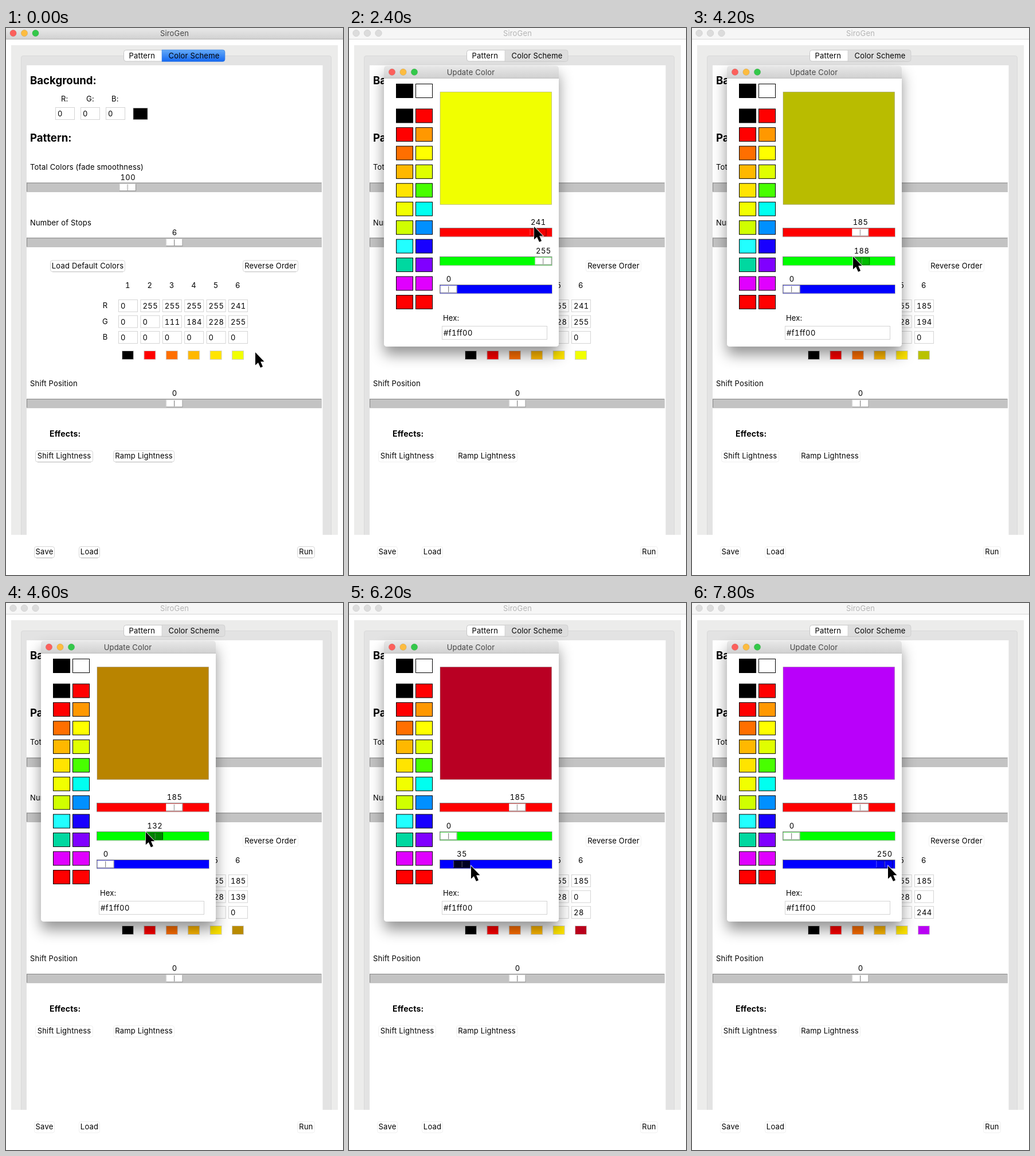
These frames come from a looping animation (588x953 px, 8000 ms). An HTML page:

```html
<!DOCTYPE html>
<html lang="en">
<head>
<meta charset="utf-8">
<title>SiroGen</title>
<style>
  html, body { margin: 0; width: 100%; height: 100%; overflow: hidden; background: #fff; }
  svg { display: block; }
  text { font: 13px Inter, "Open Sans", sans-serif; letter-spacing: .18px; white-space: pre; }
  .num { font-feature-settings: "tnum"; letter-spacing: .5px; }
  .head { font-size: 18.6px; font-weight: 700; letter-spacing: 0; }
  .sub { font-size: 14px; font-weight: 700; }
</style>
</head>
<body>
<svg id="stage" width="588" height="953" viewBox="0 0 588 953"></svg>
<script>
const LOOP = 8000, STEP = 200, OPEN = 600, PALETTE = 800;
const stage = document.getElementById('stage');

// Keyframes: [time, ...values]
const cursorKeys = [[0, 435, 565], [400, 404, 567], [1000, 404, 567], [2200, 323, 346],
  [2400, 323, 346], [3200, 287, 347], [3700, 324, 398], [4200, 281, 398], [5200, 188, 400],
  [5550, 157, 400], [5950, 190, 458], [6800, 268, 458], [7800, 342, 458]];
const channels = [
  { y: 348, color: '#f00', held: [2200, 3300], keys: [[2400, 241], [3200, 185]] },
  { y: 398, color: '#0f0', held: [3600, 5700], keys: [[3700, 255], [4200, 188], [5200, 49], [5550, 0]] },
  { y: 447, color: '#00f', held: [5900, LOOP], keys: [[5950, 0], [6800, 118], [7800, 250]] }
];
const stops = [[0, 0, 0], [255, 0, 0], [255, 111, 0], [255, 184, 0], [255, 228, 0]];
const palette = [
  ['#000', '#f00', '#ff6f00', '#ffb800', '#ffe400', '#f1ff00', '#d0ff00', '#22ffff', '#00d8a0', '#e000ff', '#f00'],
  ['#f00', '#ff9800', '#ff0', '#e0ff00', '#48ff00', '#00fff0', '#0090ff', '#1800ff', '#8000ff', '#e000ff', '#f00']
];

function sample(keys, t) {
  const next = keys.findIndex(k => k[0] > t);
  if (next === 0) return keys[0].slice(1);
  if (next < 0) return keys[keys.length - 1].slice(1);
  const a = keys[next - 1], b = keys[next], p = (t - a[0]) / (b[0] - a[0]);
  return a.slice(1).map((v, i) => v + (b[i + 1] - v) * p);
}
const levels = t => channels.map(c => Math.round(sample(c.keys, t)[0]));
const rgb = c => `rgb(${c})`;

const rect = (x, y, w, h, fill, extra = '') =>
  `<rect x="${x}" y="${y}" width="${w}" height="${h}" fill="${fill}" ${extra}/>`;
const line = (x1, y1, x2, y2, color) =>
  `<path d="M${x1} ${y1}L${x2} ${y2}" stroke="${color}" fill="none"/>`;
const text = (x, y, s, cls = '', anchor = 'start', fill = '#000') =>
  `<text x="${x}" y="${y}" class="${cls}" text-anchor="${anchor}" fill="${fill}">${s}</text>`;
const middle = (x, y, s, cls, fill) => text(x, y, s, cls, 'middle', fill);

const entry = (x, y, w, s) =>
  rect(x + .5, y + .5, w - 1, 21, '#fff', 'stroke="#d4d4d4"') + text(x + 4, y + 16, s, 'num');

const button = (x, y, w, s, dim) =>
  rect(x + .5, y + .5, w - 1, 19.5, '#fff', `rx="3.5" stroke="${dim ? '#efefef' : '#d6d6d6'}"`) +
  (dim ? '' : line(x + 4, y + 20.3, x + w - 4, y + 20.3, '#c4c4c4')) +
  middle(x + w / 2, y + 14, s);

function slider(x, y, w, knobX, value, color, knob = '#fff') {
  const l = knobX - 14.5, r = knobX + 14.5;
  const pressed = knob !== '#fff';
  const shade = pressed ? 'rgba(0,0,0,.45)' : '#8c8c8c';
  const light = pressed ? 'rgba(255,255,255,.35)' : '#e2e2e2';
  return rect(x, y, w, 16, color) +
    line(x, y + .5, x + w, y + .5, '#858585') + line(x + .5, y, x + .5, y + 16, '#858585') +
    line(x, y + 15.8, x + w, y + 15.8, '#bcbcbc') + line(x + w - .5, y, x + w - .5, y + 16, '#c8c8c8') +
    rect(l, y + 2, 29, 12.5, knob) +
    line(l, y + 2, r, y + 2, pressed ? shade : light) + line(l + .5, y + 2, l + .5, y + 14, light) +
    line(l, y + 14.2, r, y + 14.2, shade) + line(r - .5, y + 2, r - .5, y + 14, shade) +
    line(knobX - .5, y + 3, knobX - .5, y + 13.5, shade) + line(knobX + .5, y + 3, knobX + .5, y + 13.5, light) +
    middle(knobX + .3, y - 4.8, value, 'num');
}

const lights = (x, y, active) => ['#fc605c', '#fdbc40', '#34c84a'].map((c, i) =>
  `<circle cx="${x + i * 19.5}" cy="${y}" r="5.7" fill="${active ? c : '#dcdcdc'}" stroke="${active ? 'rgba(0,0,0,.14)' : '#cacaca'}" stroke-width=".7"/>`).join('');

function tabs(active) {
  return rect(205.5, 38.5, 176, 19.5, '#fff', 'rx="4" stroke="#c6c6c6"') +
    `<path d="M272 38H378Q382 38 382 42V54.500Q382 58.500 378 58.500H272Z" fill="${active ? 'url(#blue)' : '#dedede'}" stroke="${active ? '#3b7fe0' : '#c6c6c6'}" stroke-width=".6"/>` +
    middle(237.3, 53, 'Pattern') + middle(328, 53, 'Color Scheme');
}

function mainWindow(active, lastStop) {
  const dim = !active;
  let s = rect(0, 0, 588, 953, '#fff') +
    rect(0, 0, 588, 19.5, active ? 'url(#bar)' : '#f6f6f6') +
    line(0, 19.5, 588, 19.5, active ? '#b4b4b4' : '#d6d6d6') +
    lights(12.5, 9, active) + middle(294, 14, 'SiroGen', '', active ? '#454545' : '#b4b4b4') +
    rect(9, 30, 570, 853, '#ececeb') +
    '<path d="M26.500 883V52Q26.500 48.500 30 48.500H564Q567.500 48.500 567.500 52V883" fill="#e3e3e3" stroke="#d9d9d9"/>' +
    rect(36, 65, 516.5, 818, '#fff') + tabs(active);

  s += text(42, 98, 'Background:', 'head') + text(42, 197.500, 'Pattern:', 'head');
  ['R:', 'G:', 'B:'].forEach((name, i) => {
    s += text(96 + i * 44, 128, name) + entry(86 + i * 44, 138, 34, 0);
  });
  s += rect(222, 139.5, 25, 20, '#000', 'stroke="#a8a8a8" stroke-width=".8"');

  s += text(42, 247, 'Total Colors (fade smoothness)') + slider(36, 269.5, 515, 212.5, 100, '#c3c3c3') +
    text(42, 343.5, 'Number of Stops') + slider(36, 365.5, 515, 294, 6, '#c3c3c3') +
    button(77, 404.5, 131, 'Load Default Colors', dim) + button(413, 404.5, 97, 'Reverse Order', dim);

  ['R', 'G', 'B'].forEach((name, row) => { s += middle(173, 488 + row * 27.5, name); });
  [...stops, lastStop].forEach((color, i) => {
    const x = 196 + i * 38.4;
    s += middle(x + 16.5, 453, i + 1, 'num');
    color.forEach((v, row) => { s += entry(x, 473 + row * 27.5, 34, v); });
    s += rect(x + 6.5, 562.5, 20, 15, rgb(color), 'stroke="#d0d0d0"');
  });

  return s + text(42, 623.5, 'Shift Position') + slider(36, 646, 515, 294, 0, '#c3c3c3') +
    text(76, 712, 'Effects:', 'sub') +
    button(51, 736, 101, 'Shift Lightness', dim) + button(187, 736, 107, 'Ramp Lightness', dim) +
    button(49, 903, 36, 'Save', dim) + button(127, 903, 37, 'Load', dim) + button(508, 903, 31, 'Run', dim);
}

const chip = (x, y, color) => rect(x, y, 29, 24, color, 'stroke="#000"');

function dialog(t, color) {
  let s = rect(61, 66, 305, 489, '#fff', 'rx="5" filter="url(#shadow)"') +
    '<path d="M61 87V71Q61 66 66 66H361Q366 66 366 71V87Z" fill="url(#bar)"/>' +
    line(61, 87.5, 366, 87.5, '#bcbcbc') + lights(75, 76.8, true) +
    middle(212.5, 81.5, 'Update Color', '', '#454545') +
    rect(159, 111.5, 194.5, 196, rgb(color), 'stroke="rgba(128,128,128,.45)"');

  channels.forEach((c, i) => {
    const held = t >= c.held[0] && t < c.held[1];
    const tint = [0, 0, 0];
    tint[i] = color[i];
    s += slider(158, c.y, 197, 174 + color[i] * .6475, color[i], c.color, held ? rgb(tint) : '#fff');
  });

  if (t >= PALETTE) {
    s += chip(82.5, 97.5, '#000') + chip(116.5, 97.5, '#fff');
    palette.forEach((column, i) => column.forEach((c, row) => {
      s += chip(82.5 + i * 34, 141 + row * 32.45, c);
    }));
  }
  return s + text(164, 510, 'Hex:') +
    rect(162.5, 519.5, 183, 23, '#fff', 'stroke="#d4d4d4"') + text(165, 536, '#f1ff00', 'num');
}

const cursor = ([x, y]) =>
  `<path transform="translate(${x} ${y})" d="M0 0V22.500L5 18L9 26.800L13 25L9.200 16.300H15.500Z" fill="#000" stroke="#fff" stroke-width="1.500" paint-order="stroke"/>`;

const gradient = (id, top, bottom) =>
  `<linearGradient id="${id}" x2="0" y2="1"><stop stop-color="${top}"/><stop offset="1" stop-color="${bottom}"/></linearGradient>`;
const defs = '<defs>' + gradient('bar', '#e8e8e8', '#d1d1d1') + gradient('blue', '#64aaf8', '#1468f2') +
  '<filter id="shadow" x="-25%" y="-25%" width="150%" height="150%"><feDropShadow dx="0" dy="14" stdDeviation="12" flood-opacity=".42"/></filter></defs>';

function render(t) {
  const open = t >= OPEN;
  // The main window's fields trail the dialog's sliders slightly.
  stage.innerHTML = defs + mainWindow(!open, levels(t - 45)) +
    (open ? dialog(t, levels(t)) : '') + cursor(sample(cursorKeys, t));
}

let shown = -1;
const start = performance.now();
function tick() {
  const t = Math.floor(((performance.now() - start) % LOOP) / STEP) * STEP;
  if (t !== shown) render(shown = t);
  requestAnimationFrame(tick);
}
tick();
</script>
</body>
</html>
```
